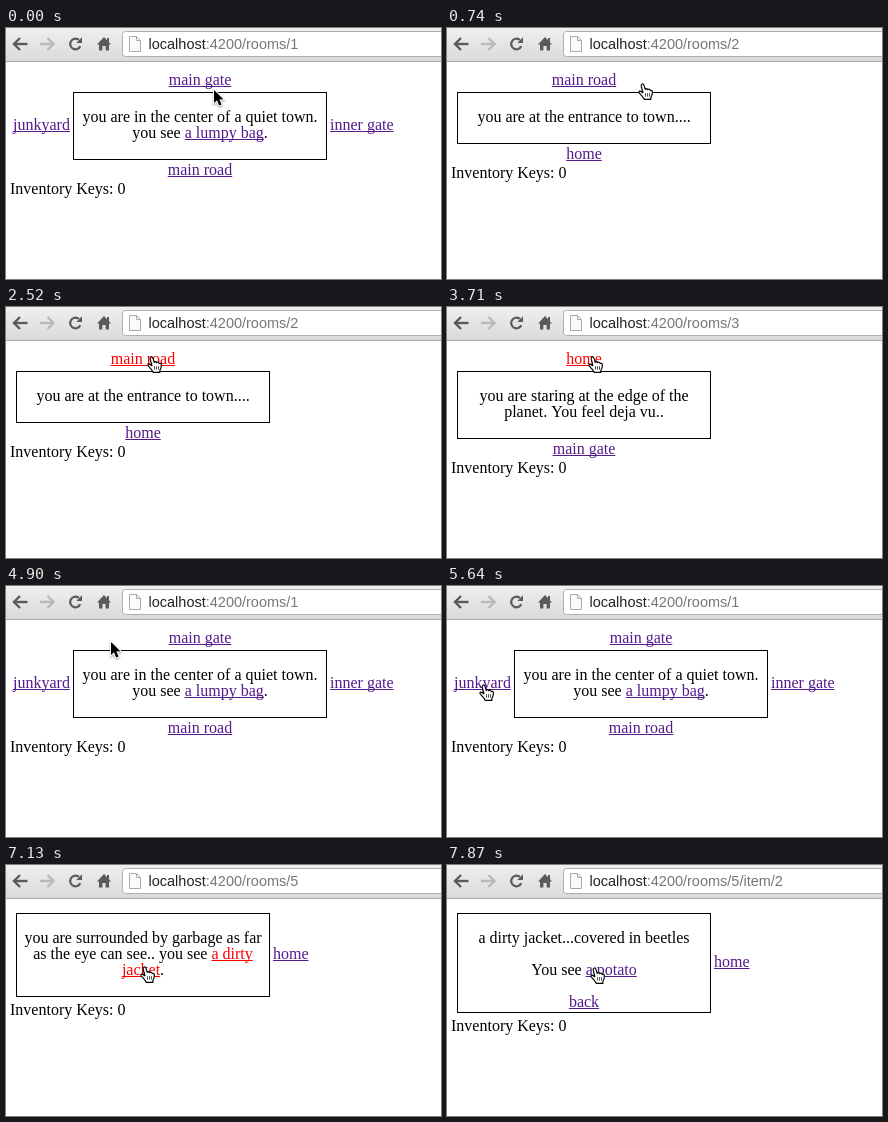
Animation, 435 px wide and 251 px high, one loop 8000 ms. Source, as an HTML page with a canvas:

```html
<!DOCTYPE html>
<html lang="en">
<head>
<meta charset="utf-8">
<title>Text adventure</title>
<style>
html, body { margin: 0; width: 435px; height: 251px; overflow: hidden; background: #fff; }
canvas { display: block; }
</style>
</head>
<body>
<canvas id="stage" width="435" height="251"></canvas>
<script>
const ctx = document.getElementById('stage').getContext('2d');
const LOOP = 8000;
const SERIF = '16px "Liberation Serif", Times, serif';
const SANS = '14.5px "Liberation Sans", Arial, sans-serif';

// Links are written in [brackets]; a null line leaves a paragraph gap.
const ROOMS = {
  town: {
    path: '1', north: 'main gate', south: 'main road', west: 'junkyard', east: 'inner gate',
    lines: ['you are in the center of a quiet town.', 'you see [a lumpy bag].']
  },
  gate: {
    path: '2', north: 'main road', south: 'home',
    lines: ['you are at the entrance to town....']
  },
  edge: {
    path: '3', north: 'home', south: 'main gate',
    lines: ['you are staring at the edge of the', 'planet. You feel deja vu..']
  },
  junk: {
    path: '5', east: 'home',
    lines: ['you are surrounded by garbage as far', 'as the eye can see.. you see [a dirty]', '[jacket].']
  },
  jacket: {
    path: '5/item/2', east: 'home', tight: true,
    lines: ['a dirty jacket...covered in beetles', null, 'You see [a potato]', null, '[back]']
  }
};

// start time, room, pressed links
const PAGES = [
  [0, 'town'], [590, 'town', 'main gate'], [740, 'gate'],
  [2520, 'gate', 'main road'], [2660, 'edge'],
  [3710, 'edge', 'home'], [3860, 'town'],
  [5790, 'town', 'junkyard'], [5940, 'junk'],
  [7120, 'junk', 'a dirty jacket'], [7270, 'jacket']
];

// start time, pointer, x, y
const POINTER = [
  [0, arrow, 208, 62], [140, hand, 197, 57], [290, hand, 191, 55],
  [1190, arrow, 178, 68], [1340, arrow, 122, 100], [1490, arrow, 62, 121],
  [1640, arrow, 25, 125], [1780, arrow, 42, 112], [1930, arrow, 92, 80],
  [2080, arrow, 128, 66], [2230, hand, 140, 54], [2370, hand, 141, 49],
  [4010, arrow, 146, 50], [4900, arrow, 105, 56], [5050, arrow, 72, 73],
  [5200, arrow, 48, 85], [5350, hand, 36, 94], [5500, hand, 33, 97], [5640, hand, 32, 98],
  [6530, hand, 52, 99], [6680, arrow, 90, 101], [6830, hand, 122, 101], [6970, hand, 134, 101],
  [7720, hand, 139, 102], [7870, hand, 143, 102]
];

const at = (track, t) => track.findLast(step => step[0] <= t);

function poly(points) {
  ctx.beginPath();
  points.forEach(([x, y]) => ctx.lineTo(x, y));
  ctx.closePath();
}

function line(points, width, color) {
  ctx.beginPath();
  points.forEach(([x, y]) => ctx.lineTo(x, y));
  ctx.lineWidth = width;
  ctx.strokeStyle = color;
  ctx.stroke();
}

function arrow() {
  poly([[0, 0], [0, 13], [3, 10.3], [5.2, 15.4], [7.6, 14.4], [5.4, 9.5], [9.4, 9.3]]);
  ctx.save();
  ctx.shadowColor = 'rgba(0,0,0,.4)';
  ctx.shadowBlur = 2;
  ctx.shadowOffsetY = 1;
  ctx.lineWidth = 2;
  ctx.strokeStyle = '#fff';
  ctx.stroke();
  ctx.restore();
  ctx.fillStyle = '#000';
  ctx.fill();
}

function hand() {
  ctx.beginPath();
  ctx.moveTo(5, 10);
  ctx.lineTo(3.2, 3.2);
  ctx.bezierCurveTo(2.8, .6, 5.4, .2, 6, 2.4);
  ctx.lineTo(7.2, 6.2);
  ctx.quadraticCurveTo(8.8, 4.7, 9.8, 6.6);
  ctx.quadraticCurveTo(11.4, 5.4, 12.2, 7.4);
  ctx.quadraticCurveTo(14.2, 6.8, 14.4, 9);
  ctx.quadraticCurveTo(14.4, 12, 13, 14);
  ctx.lineTo(12.8, 16.4);
  ctx.lineTo(6.4, 16.4);
  ctx.quadraticCurveTo(4.5, 13.2, 1.2, 9.8);
  ctx.bezierCurveTo(.2, 7.8, 2.4, 7.3, 5, 10);
  ctx.fillStyle = '#fff';
  ctx.fill();
  ctx.lineWidth = 1.2;
  ctx.strokeStyle = '#000';
  ctx.stroke();
  for (const x of [7.5, 9.5, 11.5]) line([[x, 10.2], [x, 13.6]], .8, '#222');
}

function toolbar(path) {
  const shade = ctx.createLinearGradient(0, 0, 0, 33);
  shade.addColorStop(0, '#efefef');
  shade.addColorStop(1, '#dadada');
  ctx.fillStyle = shade;
  ctx.fillRect(0, 0, 435, 33);
  ctx.fillStyle = '#a8a8a8';
  ctx.fillRect(0, 33, 435, 1);

  ctx.beginPath();
  ctx.roundRect(116.5, 3.5, 340, 25, 3);
  ctx.fillStyle = '#fff';
  ctx.fill();
  ctx.lineWidth = 1;
  ctx.strokeStyle = '#b0b0b0';
  ctx.stroke();

  const dark = '#5a5a5a';
  navArrow(6.5, 1, dark);
  navArrow(49, -1, '#b9b9b9');
  reload(dark);
  house(dark);

  poly([[123.5, 8.5], [130.5, 8.5], [134.5, 12.5], [134.5, 23.5], [123.5, 23.5]]);
  ctx.fillStyle = '#fafafa';
  ctx.fill();
  ctx.lineWidth = 1;
  ctx.strokeStyle = '#aaa';
  ctx.stroke();
  line([[130.5, 8.5], [130.5, 12.5], [134.5, 12.5]], 1, '#aaa');

  ctx.font = SANS;
  ctx.fillStyle = '#222';
  ctx.fillText('localhost', 142.5, 21);
  const x = 142.5 + ctx.measureText('localhost').width;
  ctx.fillStyle = '#777';
  ctx.fillText(':4200/rooms/' + path, x, 21);
}

function navArrow(x, dir, color) {
  const px = d => x + dir * d;
  line([[px(1.5), 16], [px(15), 16]], 2.4, color);
  line([[px(7.5), 10], [px(1.5), 16], [px(7.5), 22]], 2.4, color);
}

function reload(color) {
  ctx.beginPath();
  ctx.arc(69.5, 16, 5.3, .45, 5.4);
  ctx.lineWidth = 2.2;
  ctx.strokeStyle = color;
  ctx.stroke();
  poly([[76, 9.3], [76, 15], [70.3, 15]]);
  ctx.fillStyle = color;
  ctx.fill();
}

function house(color) {
  ctx.fillStyle = color;
  poly([[98, 9], [105, 16.5], [103, 16.5], [103, 22.5], [99.6, 22.5], [99.6, 18],
    [96.4, 18], [96.4, 22.5], [93, 22.5], [93, 16.5], [91, 16.5]]);
  ctx.fill();
  ctx.fillRect(101, 10, 2, 4);
}

function rich(text, x, y, pressed) {
  text.split(/[\[\]]/).forEach((part, i) => {
    const width = ctx.measureText(part).width;
    const link = i % 2 === 1;
    ctx.fillStyle = !link ? '#000' : pressed && pressed.includes(part) ? '#f00' : '#551a8b';
    ctx.fillText(part, x, y);
    if (link) ctx.fillRect(x, y + 1, width, 1);
    x += width;
  });
}

function centered(text, mid, y, pressed) {
  const width = ctx.measureText(text.replace(/[\[\]]/g, '')).width;
  rich(text, mid - width / 2, y, pressed);
}

// Lays the room out like a 3 by 3 table with 2px spacing and 1px padding.
function page(room, pressed) {
  ctx.font = SERIF;
  const left = room.west ? 67 : 10;
  const mid = left + 127;
  const top = room.north ? 64 : 48;
  const height = room.lines.length * 16 + (room.tight ? 20 : 36);
  const bottom = top + height;
  const side = top + height / 2 + 4;

  ctx.lineWidth = 1;
  ctx.strokeStyle = '#000';
  ctx.strokeRect(left + .5, top + .5, 253, height - 1);
  room.lines.forEach((text, i) => {
    if (text) centered(text, mid, top + 30 + i * 16, pressed);
  });

  if (room.north) centered(`[${room.north}]`, mid, 57, pressed);
  if (room.south) centered(`[${room.south}]`, mid, bottom + 15, pressed);
  if (room.west) rich(`[${room.west}]`, 7, side, pressed);
  if (room.east) rich(`[${room.east}]`, left + 257, side, pressed);
  rich('Inventory Keys: 0', 4, bottom + (room.south ? 34 : 18), pressed);
}

function draw(now) {
  const t = now % LOOP;
  const [, name, pressed] = at(PAGES, t);
  const [, pointer, x, y] = at(POINTER, t);
  ctx.fillStyle = '#fff';
  ctx.fillRect(0, 0, 435, 251);
  toolbar(ROOMS[name].path);
  page(ROOMS[name], pressed);
  ctx.save();
  ctx.translate(x, y);
  pointer();
  ctx.restore();
}

let start;
function tick(now) {
  start ??= now;
  draw(now - start);
  requestAnimationFrame(tick);
}
draw(0);
requestAnimationFrame(tick);
</script>
</body>
</html>
```
